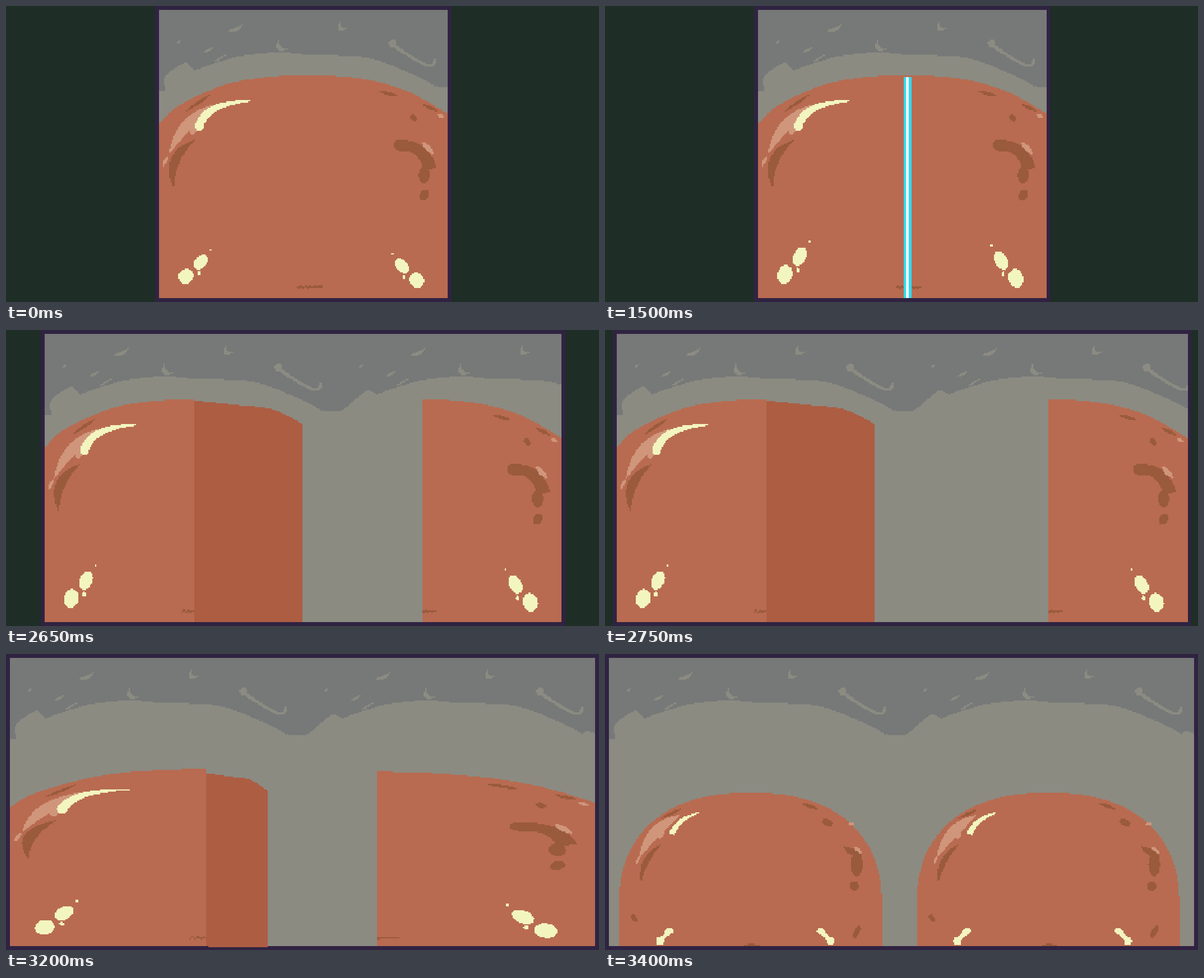
An HTML page with a canvas for the animation above (6.4 s loop, 1058 by 529 pixels).

```html
<!DOCTYPE html>
<html lang="en">
<head>
<meta charset="utf-8">
<title>Sliced block</title>
<style>
html, body { margin: 0; width: 100%; height: 100%; overflow: hidden; background: #1e2d25; }
canvas { display: block; width: 100vw; height: 100vh; image-rendering: pixelated; }
</style>
</head>
<body>
<canvas id="stage" width="1058" height="529"></canvas>
<script>
const W = 460, H = 230, PX = 2.3, LOOP = 6400, STEP = 50;
const TOP = 3, BOTTOM = 227, FLOOR = 523, TILE = 529;

const C = {
  back: '#1e2d25', border: '#302342', wall: '#777978', haze: '#8b8b82',
  red: '#b86b50', side: '#ad5d42', brown: '#9a5a3c', pink: '#d0967b',
  glow: '#f3f5bf', cyan: '#2cdcf0', white: '#f3f0fc'
};

// --- Shape builders, in stage units ---

function oval(x, y, rx, ry = rx, deg = 0) {
  const p = new Path2D();
  p.ellipse(x, y, rx, ry, deg * Math.PI / 180, 0, 7);
  return p;
}

// Two curves between the same ends; each bow is a distance from the chord.
function sliver(x0, y0, x1, y1, bowA, bowB) {
  const p = new Path2D(), dx = x1 - x0, dy = y1 - y0, len = Math.hypot(dx, dy);
  const bend = bow => [(x0 + x1) / 2 + 2 * bow * dy / len, (y0 + y1) / 2 - 2 * bow * dx / len];
  p.moveTo(x0, y0);
  p.quadraticCurveTo(...bend(bowA), x1, y1);
  p.quadraticCurveTo(...bend(bowB), x0, y0);
  return p;
}

// A bent stroke whose width goes from w0 to w1.
function brush([x0, y0], [cx, cy], [x1, y1], w0, w1) {
  const p = new Path2D(), near = [], far = [];
  for (let t = 0; t <= 1; t += 1 / 16) {
    const u = 1 - t;
    const x = u * u * x0 + 2 * u * t * cx + t * t * x1;
    const y = u * u * y0 + 2 * u * t * cy + t * t * y1;
    const vx = u * (cx - x0) + t * (x1 - cx), vy = u * (cy - y0) + t * (y1 - cy);
    const r = (w0 + (w1 - w0) * t * t) / 2 / Math.hypot(vx, vy);
    near.push([x + vy * r, y - vx * r]);
    far.unshift([x - vy * r, y + vx * r]);
  }
  for (const q of [...near, ...far]) p.lineTo(...q);
  return p;
}

// A smooth skyline through the points, filled down past the floor.
function hill(...pts) {
  const p = new Path2D(), at = i => pts[Math.max(0, Math.min(pts.length - 1, i))];
  p.moveTo(pts[0][0], TILE);
  p.lineTo(...pts[0]);
  for (let i = 0; i < pts.length - 1; i++) {
    const [a, b, c, d] = [at(i - 1), at(i), at(i + 1), at(i + 2)];
    p.bezierCurveTo(b[0] + (c[0] - a[0]) / 6, b[1] + (c[1] - a[1]) / 6,
      c[0] - (d[0] - b[0]) / 6, c[1] - (d[1] - b[1]) / 6, ...c);
  }
  p.lineTo(at(pts.length)[0], TILE);
  return p;
}

// A fading zigzag; dir flips its first tooth.
function scribble(dir, mid) {
  const p = new Path2D(), n = 12;
  const y = i => mid + dir * (i % 2 ? 3 : -3) * (1 - i / n);
  for (let i = 0; i <= n; i++) p.lineTo(518 + 4 * i, y(i) - 1.8);
  for (let i = n; i >= 0; i--) p.lineTo(518 + 4 * i, y(i) + 1.8);
  return [p];
}

function dome(cx, base, rx, ry, power) {
  const p = new Path2D(), e = 2 / power;
  p.moveTo(cx + rx, TILE);
  for (let a = 0; a <= 64; a++) {
    const c = Math.cos(a * Math.PI / 64), s = Math.sin(a * Math.PI / 64);
    p.lineTo(cx + rx * Math.sign(c) * Math.abs(c) ** e, base - ry * Math.max(0, s) ** e);
  }
  p.lineTo(cx - rx, TILE);
  return p;
}

// --- Scenery ---

const skyTile = [
  hill([70, 115], [130, 95], [165, 88], [222, 83], [280, 88], [376, 92], [448, 117], [500, 143]),
  sliver(128, 44, 157, 32, -1, -7),
  sliver(331, 25, 345, 40, -7, -16),
  sliver(221, 57, 239, 77, -8, -16),
  sliver(37, 68, 49, 61, 2, -1),
  sliver(85, 84, 106, 73, 2, -2),
  sliver(104, 100, 128, 86, 2, -2),
  oval(424, 67, 7),
  brush([427, 71], [455, 92], [484, 106], 6, 5),
  brush([482, 105], [500, 110], [499, 94], 5, 6)
];
const skyEnds = [
  hill([0, 152], [18, 151], [18, 127], [52, 102], [70, 115]),
  hill([500, 143], [527, 146], [545, 138], [580, 109], [600, 115]),
  hill([1029, 143], [1037, 138], [1058, 146])
];

const block = {
  red: [hill([273, 211], [310, 177], [400, 138], [508, 124], [625, 129], [715, 152], [790, 194])],
  brown: [
    sliver(319, 189, 367, 157, 3, -3),
    sliver(299, 327, 339, 238, 27, 10),
    sliver(664, 152, 701, 162, 4, -3),
    sliver(742, 175, 770, 188, 3, -4),
    oval(727, 200, 7, 5, 50),
    oval(703, 249, 12, 10, 10),
    brush([700, 249], [745, 246], [757, 292], 19, 24),
    oval(746, 302, 10, 15),
    oval(746, 338, 8, 11, 30)
  ],
  pink: [
    sliver(290, 266, 384, 174, 25, 5),
    oval(335, 221, 6, 9, 30),
    sliver(280, 288, 290, 267, 4, -2),
    sliver(769, 193, 782, 201, 4, -3),
    sliver(742, 242, 763, 265, 5, -5)
  ],
  glow: [oval(345, 217, 7), brush([344, 217], [356, 172], [437, 170], 15, 2)]
};
const restMark = scribble(1, 502), cutMark = scribble(-1, 503);
const side = [hill([0, 126], [85, 135], [140, 142], [194, 168])];

// The right pair of lights mirrors the left one, slightly lower.
const eyes = [1, -1].map(dir => {
  const x = d => 527 - dir * d, drop = dir < 0 ? 7 : 0;
  return {
    base: 496 + drop,
    paths: [
      oval(x(206), 483 + drop, 14.2, 12.8, -45 * dir),
      oval(x(179.5), 457.5 + drop, 15, 10.5, -48 * dir),
      oval(x(183), 477 + drop, 3, 4),
      oval(x(162), 436 + drop, 2)
    ]
  };
});

const cube = {
  red: [dome(259.5, 450, 234.5, 202, 2.35)],
  brown: [
    sliver(98, 295, 137, 276, 3, -3),
    sliver(64, 409, 101, 339, 15, 5),
    oval(52, 472, 4, 8, -30),
    sliver(349, 267, 381, 278, 4, -3),
    oval(397, 301, 10, 6, 20),
    sliver(425, 343, 459, 360, 4, -8),
    oval(449, 376, 10.5, 22),
    oval(445, 415, 8),
    oval(449, 497, 5, 12, 30),
    oval(262, 522, 15, 4)
  ],
  pink: [
    sliver(61, 364, 134, 287, 20, 1),
    oval(100, 323, 4, 8, 20),
    sliver(56, 376, 64, 361, 4, -1),
    oval(439, 304, 5, 3),
    sliver(443, 344, 459, 357, 4, -3)
  ],
  glow: [
    brush([119, 322], [130, 294], [167, 284], 10, 2),
    ...[1, -1].flatMap(dir => {
      const x = d => 250 - dir * d;
      return [oval(x(152), 513, 7, 8), oval(x(136), 496, 8, 6, -30 * dir),
        brush([x(150), 510], [x(143), 503], [x(137), 497], 7, 7)];
    })
  ]
};

// --- Pixel drawing ---

const out = document.getElementById('stage').getContext('2d');
function makeLayer(options) {
  const c = document.createElement('canvas');
  c.width = W;
  c.height = H;
  return c.getContext('2d', options);
}
const g = makeLayer({ willReadFrequently: true });
const picture = makeLayer();
const image = picture.createImageData(W, H);
const pixels = new Uint32Array(image.data.buffer);
let offset = 0; // where the pixel grid starts on the stage

function pack(hex) {
  const n = parseInt(hex.slice(1), 16);
  return (255 << 24 | (n & 255) << 16 | (n >> 8 & 255) << 8 | n >> 16) >>> 0;
}

function rect(color, x0, y0, x1, y1) {
  const c = pack(color);
  for (let y = y0; y < y1; y++) pixels.fill(c, y * W + x0, y * W + x1);
}

// Hard-edged fill, limited to the pixel columns x0..x1.
function fill(color, paths, map, x0, x1) {
  const w = x1 - x0, h = BOTTOM - TOP;
  if (w <= 0) return;
  const { sx = 1, dx = 0, sy = 1, dy = 0 } = map;
  g.setTransform(1, 0, 0, 1, 0, 0);
  g.clearRect(0, 0, W, H);
  g.setTransform(sx / PX, 0, 0, sy / PX, (dx - offset) / PX, dy / PX);
  for (const p of paths) g.fill(p);
  const a = g.getImageData(x0, TOP, w, h).data, c = pack(color);
  for (let y = 0, i = 3; y < h; y++)
    for (let x = 0; x < w; x++, i += 4)
      if (a[i] > 127) pixels[(y + TOP) * W + x + x0] = c;
}

function fillParts(parts, map, x0, x1) {
  for (const name in parts) fill(C[name], parts[name], map, x0, x1);
}

// Maps columns a0..a1 to b0..b1 and squashes towards the floor.
function span(a0, a1, b0, b1, sy = 1) {
  const sx = (b1 - b0) / (a1 - a0);
  return { sx, dx: (b0 - a0 * sx) * PX, sy, dy: FLOOR * (1 - sy) };
}

// --- Scenes ---

function drawPanel(left, right) {
  rect(C.back, 0, 0, W, H);
  rect(C.border, left - 3, 0, right + 3, H);
  rect(C.wall, left, TOP, right, BOTTOM);
  const dx = (left - 3) * PX + offset;
  fill(C.haze, skyEnds, { dx }, left, right);
  for (const shift of [0, TILE]) fill(C.haze, skyTile, { dx: dx + shift }, left, right);
}

function drawBlock(map, x0, x1, eye, mark) {
  fillParts(block, map, x0, x1);
  fill(C.brown, mark, map, x0, x1);
  for (const { base, paths } of eyes) {
    const shift = base * (1 - eye.s) + eye.dy;
    fill(C.glow, paths, { ...map, sy: map.sy * eye.s, dy: map.dy + map.sy * shift }, x0, x1);
  }
}

function drawWhole(t) {
  const cutting = t >= 1000;
  const k = Math.min(1, Math.max(0, (t - 1000) / 500));
  const eye = cutting ? { s: 1.02 + 0.23 * k, dy: -2 + 2 * k } : { s: 1, dy: 0 };
  offset = -0.8;
  drawPanel(119, 343);
  drawBlock(span(0, 1, 0, 1), 119, 343, eye, cutting ? cutMark : restMark);
  if (!cutting) return;
  const y = Math.round(115.6 - 60.6 * k);
  rect(C.cyan, 232, y, 238, BOTTOM);
  rect(C.white, 234, y, 236, BOTTOM);
}

function drawHalves(t) {
  const rest = Math.round(57 * 0.47 ** ((t - 2600) / STEP));
  const left = 3 + rest, right = 343 + Math.min(114, 115 - rest);
  const n = Math.max(0, (t - 3200) / STEP + 1);
  const cutL = n ? Math.round(203 - 84 * 0.57 ** n) : left + 116;
  const cutR = n ? Math.round(242 + 107 * 0.43 ** n) : right - 108;
  const sideEnd = n ? 203 : cutL + 84;
  const height = end => end + (1 - end) * 0.34 ** n;
  const eye = { s: 1.25, dy: 0 };
  offset = 0;
  drawPanel(left, right);
  drawBlock(span(119, 235, left, cutL, height(0.69)), left, cutL, eye, cutMark);
  fill(C.side, side, span(0, 84, cutL, sideEnd, height(0.67)), cutL, sideEnd);
  if (n) rect(C.side, cutL + 2, BOTTOM, sideEnd, BOTTOM + 1);
  drawBlock(span(235, 343, cutR, right, height(0.67)), cutR, right, eye, cutMark);
}

function drawCubes() {
  offset = 0;
  drawPanel(3, 457);
  for (const dx of [0, 531]) fillParts(cube, { dx }, 3, 457);
}

function draw(t) {
  if (t < 2600) drawWhole(t);
  else if (t < 3400) drawHalves(t);
  else drawCubes();
  picture.putImageData(image, 0, 0);
  out.imageSmoothingEnabled = false;
  out.fillStyle = C.back;
  out.fillRect(0, 0, W * PX, H * PX);
  out.drawImage(picture.canvas, offset, 0, W * PX, H * PX);
}

let shown = -1;
const begin = performance.now();
function tick() {
  const t = Math.floor((performance.now() - begin) % LOOP / STEP) * STEP;
  if (t !== shown) draw(shown = t);
  requestAnimationFrame(tick);
}
tick();
</script>
</body>
</html>
```
